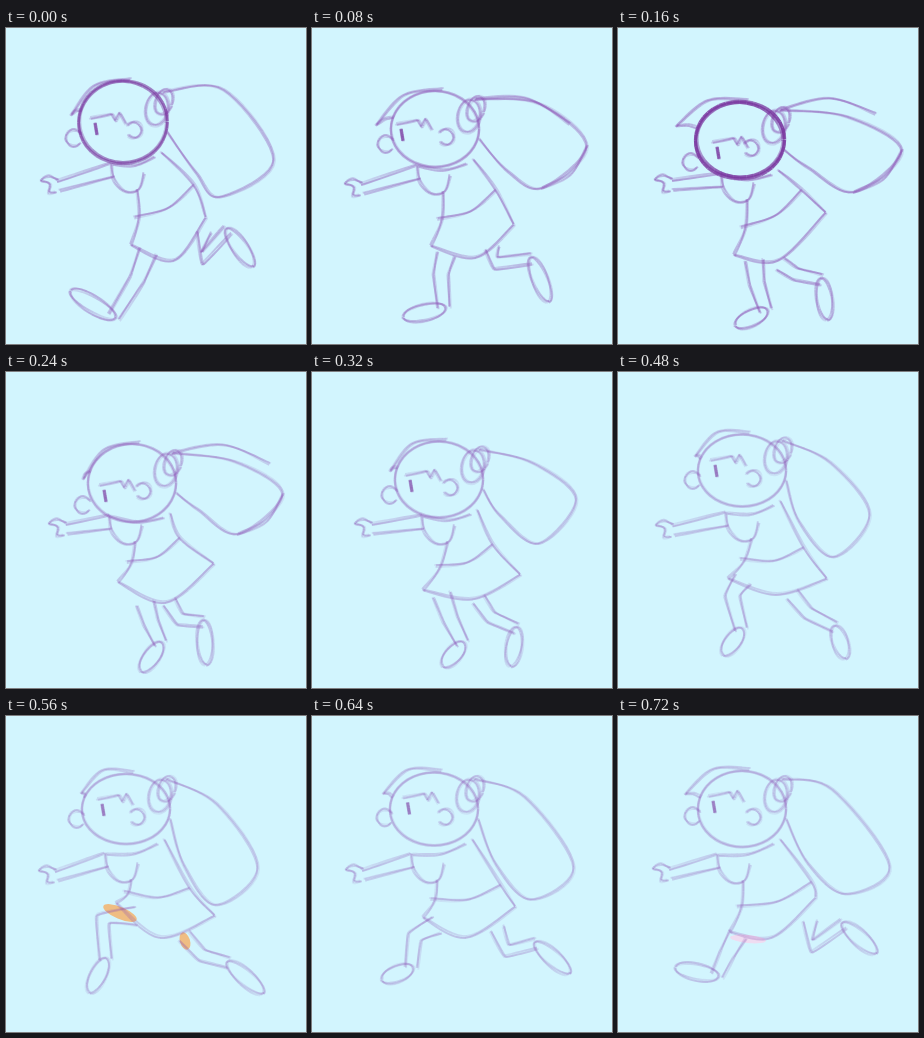
An HTML page with a canvas for the animation above (800 ms loop, 300 by 316 pixels).

```html
<!DOCTYPE html>
<html lang="en">
<head>
<meta charset="utf-8">
<title>Running sketch</title>
<style>
html, body { margin: 0; width: 100%; height: 100%; overflow: hidden; background: #d2f5fe; }
canvas { display: block; width: 100vw; height: 100vh; }
</style>
</head>
<body>
<canvas id="stage" width="300" height="316"></canvas>
<script>
const ctx = document.getElementById('stage').getContext('2d');
const STEP = 80, HEAD_RX = 44;
const PAPER = '#d2f5fe', PENCIL = '#8f57b8', DARK = '#7a369f';

// Each pose holds joints only; every line of the figure is built from them.
// head: x, y, vertical radius. tail: top, tip, low, under. Legs: hip, knee, ankle, toe.
const reach = {
  tone: .9, press: 1.6, head: [117, 94, 41], eye: [90, 101], tuft: [65, 87],
  wrist: [52, 158], shoulder: [106, 142],
  tail: [[218, 62], [268, 132], [214, 169], [190, 145]],
  waist: [188, 157], rump: [200, 190], bottom: [168, 232], front: [125, 217],
  near: [[142, 223], [131, 251], [108, 289], [66, 264]],
  far: [[198, 204], [196, 230], [222, 202], [246, 237]]
};
const push = {
  tone: .9, press: 1, head: [123, 101, 38], eye: [90, 107], tuft: [64, 97],
  wrist: [50, 161], shoulder: [106, 144],
  tail: [[228, 76], [275, 118], [230, 160], [196, 144]], lock: [258, 96],
  waist: [184, 162], rump: [202, 197], bottom: [164, 229], front: [119, 218],
  near: [[134, 226], [129, 246], [132, 280], [93, 289]],
  far: [[180, 220], [184, 235], [220, 231], [236, 272]]
};
const gather = {
  tone: 1, press: 2, head: [122, 112, 38], eye: [100, 125], tuft: [58, 98],
  wrist: [54, 157], shoulder: [104, 152],
  tail: [[230, 89], [284, 122], [236, 164], [190, 140]], lock: [258, 86],
  waist: [184, 162], rump: [208, 185], bottom: [160, 232], front: [116, 227],
  near: [[136, 232], [139, 255], [148, 283], [119, 297]],
  far: [[162, 236], [178, 246], [204, 252], [209, 290]]
};
const pass = {
  tone: .72, press: 1, head: [126, 111, 39], eye: [99, 124], tuft: [77, 107],
  wrist: [60, 157], shoulder: [104, 150],
  tail: [[230, 90], [277, 122], [232, 162], [192, 138]], lock: [264, 92],
  waist: [174, 166], rump: [208, 192], bottom: [160, 230], front: [112, 210],
  near: [[139, 231], [145, 250], [155, 272], [136, 298]],
  far: [[163, 230], [174, 247], [198, 250], [200, 291]]
};
const swing = {
  tone: .66, press: 1, head: [128, 104, 37], eye: [99, 104], tuft: [79, 91],
  wrist: [60, 157], shoulder: [117, 150],
  tail: [[214, 93], [252, 132], [222, 181], [184, 150]],
  waist: [188, 179], rump: [209, 214], bottom: [162, 223], front: [110, 226],
  near: [[120, 214], [132, 244], [147, 272], [128, 288]],
  far: [[170, 225], [184, 243], [212, 264], [198, 294]]
};
const stride = {
  tone: .6, press: 1, head: [120, 93, 35], eye: [97, 94], tuft: [75, 77],
  wrist: [50, 160], shoulder: [100, 144],
  tail: [[212, 89], [252, 152], [210, 189], [178, 150]],
  waist: [184, 172], rump: [209, 200], bottom: [154, 221], front: [110, 187],
  near: [[130, 200], [97, 203], [100, 244], [84, 275]],
  far: [[178, 220], [196, 239], [223, 247], [256, 276]],
  tint: '#efbd83', patches: [[114, 197, 18, 6, .4], [179, 225, 5, 9, -.3]]
};
const leap = {
  tone: .6, press: 1, head: [124, 93, 38], eye: [96, 91], tuft: [67, 78],
  wrist: [52, 158], shoulder: [100, 145],
  tail: [[215, 74], [272, 150], [228, 178], [190, 148]],
  waist: [194, 166], rump: [198, 182], bottom: [154, 221], front: [112, 216],
  near: [[120, 218], [109, 238], [99, 260], [59, 252]],
  far: [[192, 205], [194, 230], [226, 208], [257, 236]],
  tint: '#efdcf1', patches: [[130, 223, 18, 4, .1]]
};

const halfway = (a, b) => Array.isArray(a) ? a.map((v, i) => halfway(v, b[i])) : (a + b) / 2;

function between(a, b) {
  const shared = Object.keys(a).filter(key => key in b && key !== 'tint' && key !== 'patches');
  return Object.fromEntries(shared.map(key => [key, halfway(a[key], b[key])]));
}

const cycle = [reach, push, gather, pass, between(pass, swing), swing,
  between(swing, stride), stride, between(stride, leap), leap];

const at = ([x, y], dx, dy) => [x + dx, y + dy];

// Hermite curve through the points; bend 0 leaves sharp corners.
function curve(points, bend = .5) {
  const out = [points[0]], pick = i => points[Math.max(0, Math.min(points.length - 1, i))];
  for (let i = 0; i < points.length - 1; i++) {
    const [a, b, c, d] = [-1, 0, 1, 2].map(k => pick(i + k));
    for (let s = 1; s <= 10; s++) {
      const t = s / 10, ease = t * t * (3 - 2 * t);
      out.push([0, 1].map(k => b[k] + (c[k] - b[k]) * ease
        + bend * t * (1 - t) * ((c[k] - a[k]) * (1 - t) - (d[k] - b[k]) * t)));
    }
  }
  return out;
}

function bow(a, b, lift) {
  const dx = b[0] - a[0], dy = b[1] - a[1], len = Math.hypot(dx, dy);
  return curve([a, at(halfway(a, b), dy / len * lift, -dx / len * lift), b]);
}

function arc([x, y], rx, ry, tilt = 0, from = 0, to = 2 * Math.PI) {
  return Array.from({ length: 41 }, (_, i) => {
    const a = from + (to - from) * i / 40, u = Math.cos(a) * rx, v = Math.sin(a) * ry;
    return [x + u * Math.cos(tilt) - v * Math.sin(tilt), y + u * Math.sin(tilt) + v * Math.cos(tilt)];
  });
}

// Both outlines of a limb that tapers from one end to the other.
function limb(joints, wide, thin) {
  return [-1, 1].map(side => curve(joints.map((joint, i) => {
    const a = joints[i - 1] || joint, b = joints[i + 1] || joint;
    const dx = b[0] - a[0], dy = b[1] - a[1];
    const w = side * (wide + (thin - wide) * i / (joints.length - 1)) / Math.hypot(dx, dy);
    return at(joint, -dy * w, dx * w);
  }), .12));
}

function leg([hip, knee, ankle, toe], wide, thin) {
  const dx = toe[0] - ankle[0], dy = toe[1] - ankle[1];
  return [...limb([hip, knee, ankle], wide, thin),
    arc(halfway(ankle, toe), Math.hypot(dx, dy) / 2 + 2, 8, Math.atan2(dy, dx))];
}

function figure({ head, eye, tuft, wrist, shoulder, tail, lock, waist, rump, bottom, front, near, far }) {
  const ry = head[2], center = head.slice(0, 2);
  const tie = at(center, 34, -13), knot = at(tie, 6, -17), root = at(center, 44, 10);
  const armpit = at(shoulder, 25, 20), [top, tip, low, under] = tail;
  const lines = [
    bow(tuft, at(center, 8, -ry - 2), 13),
    bow(tuft, at(center, 3 - HEAD_RX, -12), 2),
    arc([center[0] - HEAD_RX - 5, eye[1] + 9], 8, 8, 0, -.5, -5.6),
    curve([[-6, -11], [16, -15], [20, -8], [24, -16], [30, -5]].map(d => at(eye, ...d)), 0),
    arc(at(center, 11, 8), 8, 8, 0, -2.6, 2.4),
    arc(tie, 11, 17, .2),
    arc(at(tie, 7, -7), 8, 13, .4),
    curve([knot, top, tip, low, under, root]),
    curve([[-2, 6], [-9, 7], [-8, -2], [-17, -6], [-9, -10], [0, -6]].map(d => at(wrist, ...d))),
    ...limb([wrist, shoulder], 5, 7),
    curve([[-1, -7], [2, 10], [14, 22], [27, 19], [32, 3]].map(d => at(shoulder, ...d))),
    bow(at(shoulder, 0, -6), at(center, 32, 35), -5),
    bow(armpit, front, 5),
    curve([at(center, 38, 30), waist, rump]),
    curve([front, bottom, rump]),
    bow(halfway(armpit, front), waist, -8),
    ...leg(near, 9, 6),
    ...leg(far, 7, 5)
  ];
  if (lock) lines.push(bow(knot, lock, 14), bow(tip, low, 9));
  return lines;
}

// Several light, wandering passes with uneven pressure.
function pencil(points, color, alpha, width, seed, stray = 1) {
  ctx.strokeStyle = color;
  ctx.lineWidth = width;
  for (let pass = 0; pass < 3; pass++) {
    const phase = seed * 2.4 + pass * 2.1;
    const spots = points.map(([x, y], i) =>
      [x + stray * Math.sin(i * .17 + phase), y + stray * Math.cos(i * .13 + phase * 1.7)]);
    for (let i = 1; i < spots.length; i++) {
      ctx.globalAlpha = alpha * (.3 + .12 * Math.sin(i * .3 + phase));
      ctx.beginPath();
      ctx.moveTo(...spots[i - 1]);
      ctx.lineTo(...spots[i]);
      ctx.stroke();
    }
  }
}

function draw(pose) {
  const { tone, press, head, eye, tint, patches = [] } = pose;
  ctx.globalAlpha = 1;
  ctx.fillStyle = PAPER;
  ctx.fillRect(0, 0, 300, 316);
  ctx.fillStyle = tint;
  for (const patch of patches) {
    ctx.beginPath();
    ctx.ellipse(...patch, 0, 2 * Math.PI);
    ctx.fill();
  }
  figure(pose).forEach((line, seed) => pencil(line, PENCIL, tone, 1.9, seed));
  const bold = press > 1;
  pencil(arc(head, HEAD_RX, head[2]), bold ? DARK : PENCIL, tone * press, 1.2 + press, 1, press / 2);
  pencil(curve([at(eye, -1, -6), at(eye, 1, 6)]), DARK, tone * 1.5, 3, 2, .4);
}

const start = performance.now();
function tick() {
  const time = Math.max(0, performance.now() - start);
  draw(cycle[Math.floor(time / STEP) % cycle.length]);
  requestAnimationFrame(tick);
}
tick();
</script>
</body>
</html>
```
